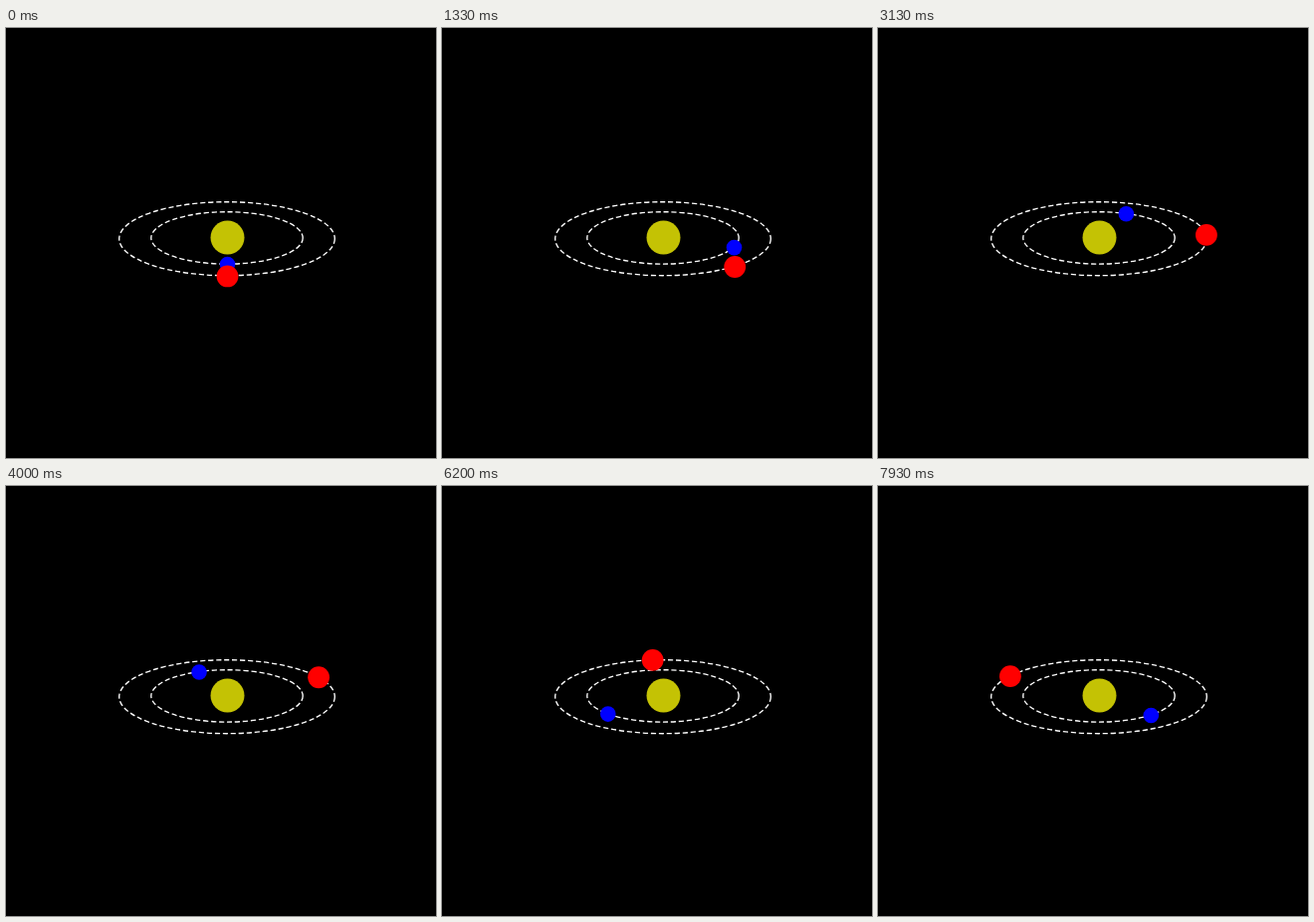
These frames come from a looping animation (432x432 px, 8000 ms). An HTML page with a canvas:

```html
<!DOCTYPE html>
<html lang="en">
<head>
<meta charset="utf-8">
<title>Two orbits</title>
<style>
  html, body { margin: 0; width: 100%; height: 100%; overflow: hidden; background: #000; }
  canvas { display: block; width: 432px; height: 432px; }
</style>
</head>
<body>
<canvas id="stage"></canvas>
<script>
const SIZE = 432, LOOP = 8000, FPS = 15;
const SUN = { x: 222.5, y: 210.5, r: 17, color: '#c4c204' };

// rx, ry: orbit radii; depth: perspective strength; step: degrees per frame
const planets = [
  { rx: 76, ry: 26.2, depth: 0.029, step: 3.377, r: 7.8, color: '#00f' },
  { rx: 108, ry: 37.3, depth: 0.042, step: 2, r: 10.9, color: '#f00' }
];
const orbits = [
  { y: 210.9, rx: 76.2, ry: 26.2 },
  { y: 211.7, rx: 108.3, ry: 37 }
];

const canvas = document.getElementById('stage');
const ctx = canvas.getContext('2d');
const ratio = window.devicePixelRatio || 1;
canvas.width = canvas.height = SIZE * ratio;
ctx.scale(ratio, ratio);

function disc(x, y, r, color) {
  ctx.fillStyle = color;
  ctx.beginPath();
  ctx.arc(x, y, r, 0, Math.PI * 2);
  ctx.fill();
}

function drawOrbit({ y, rx, ry }) {
  ctx.beginPath();
  ctx.ellipse(222, y, rx, ry, 0, 0, Math.PI * 2);
  ctx.stroke();
}

function drawPlanet(p, frame) {
  const a = frame * p.step * Math.PI / 180;
  const zoom = 1 / (1 - p.depth * Math.cos(a));
  disc(SUN.x + p.rx * Math.sin(a) * zoom, SUN.y + p.ry * Math.cos(a) * zoom, p.r, p.color);
}

function draw(time) {
  // Steps fall on times rounded to 10 ms, so allow a little lead.
  const last = LOOP * FPS / 1000 - 1;
  const frame = Math.min(last, Math.floor((time % LOOP + 3.4) * FPS / 1000));

  ctx.fillStyle = '#000';
  ctx.fillRect(0, 0, SIZE, SIZE);
  ctx.strokeStyle = '#fff';
  ctx.lineWidth = 1.35;
  ctx.setLineDash([5.2, 2.8]);
  orbits.forEach(drawOrbit);
  disc(SUN.x, SUN.y, SUN.r, SUN.color);
  planets.forEach(p => drawPlanet(p, frame));
}

function tick() {
  draw(performance.now());
  requestAnimationFrame(tick);
}
tick();
</script>
</body>
</html>
```
